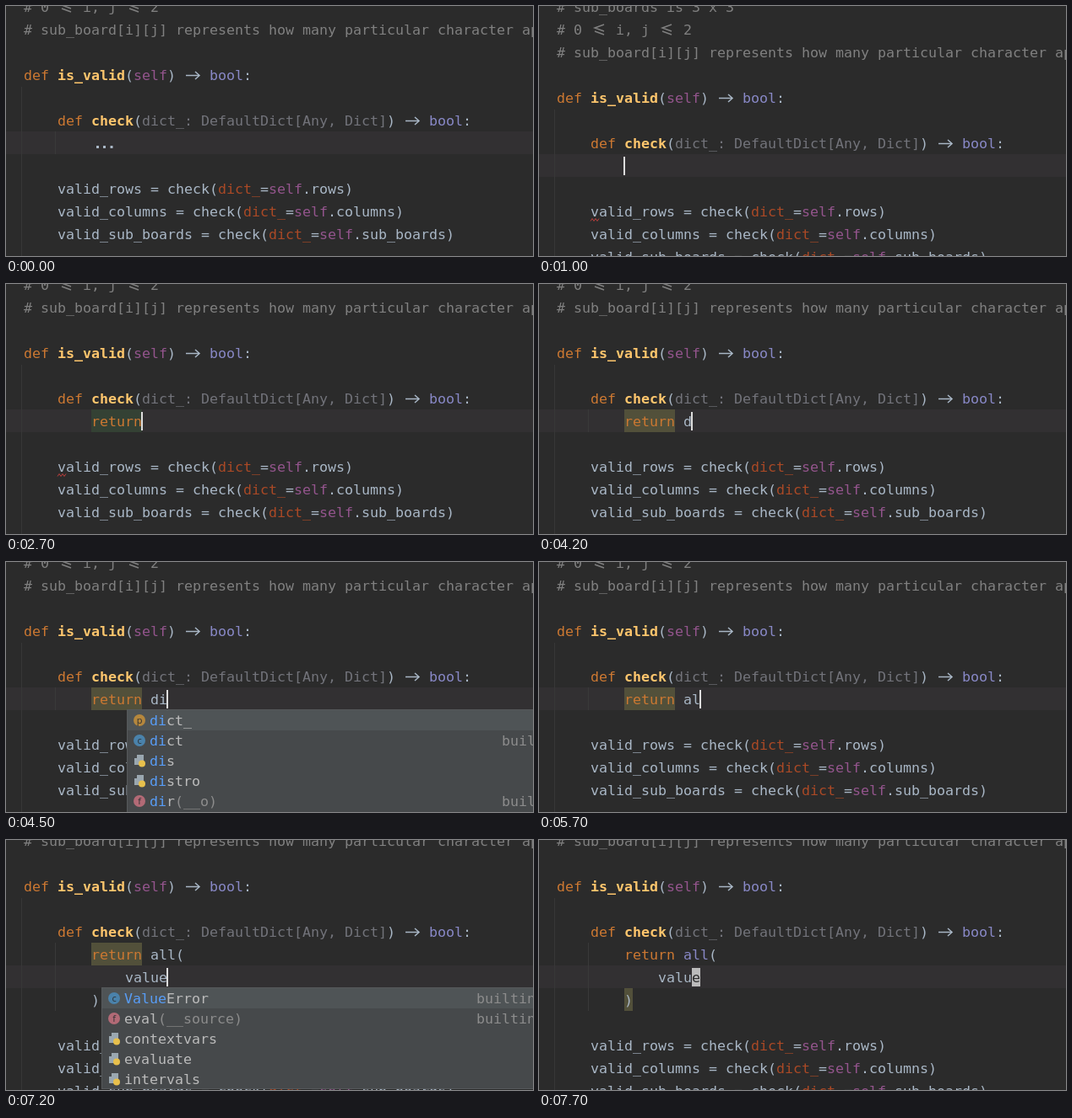
Write an HTML page with a canvas that moves like this. It is 624x297 px and loops after 8 s.

```html
<!DOCTYPE html>
<html lang="en">
<head>
<meta charset="utf-8">
<title>Typing in a code editor</title>
<style>
  html, body { margin: 0; width: 100%; height: 100%; overflow: hidden; background: #2b2b2b; }
  canvas { display: block; }
</style>
</head>
<body>
<canvas id="stage" width="624" height="297"></canvas>
<script>
const ctx = document.getElementById('stage').getContext('2d');
const LOOP = 8000, CELL = 10, ROW = 27, LEFT = 21, CARET_ROW = 149, ITEM = 24;
const MONO = '16.61px "DejaVu Sans Mono", monospace';
const UI = '11px "Open Sans", sans-serif';
const COLORS = {
  t: '#a9b7c6', k: '#cc7832', f: '#ffc66d', s: '#94558d', b: '#8888c6',
  g: '#72737a', c: '#808080', n: '#aa4926'
};
const GREEN = '#344134', OLIVE = '#52503a';

// Markup: {colour:text}; {a:} is a long arrow, {l:} a wide "less or equal", {e:} an ellipsis.
const HEAD = [
  '{c:# sub_boards is 3 x 3}',
  '{c:# 0 }{l:}{c: i, j }{l:}{c: 2}',
  '{c:# sub_board[i][j] represents how many particular character appears}',
  '',
  '{k:def }{f:is_valid}({s:self}) {a:} {b:bool}:',
  '',
  '    {k:def }{f:check}({g:dict_: DefaultDict[Any, Dict]}) {a:} {b:bool}:'
];
const TAIL = ['', ...['rows', 'columns', 'sub_boards'].map(
  name => `    valid_${name} = check({n:dict_}={s:self}.${name})`)];

const IN = ' '.repeat(8), RET = IN + '{k:return} ';
const call = (name, value) => [`${RET}${name}(`, IN + '    ' + value, IN + ')'];

// Popup items: icon|name|arguments|origin
const reItems = ['|return', 'c|reversed||builtins', 'f|repr|(__obj)|builtins', 'm|re', 'm|reprlib', 'm|resource'];
const retItems = ['|return', 'd|secretstorage', 'm|secrets'];
const dItems = ['p|dict_', 'c|dict||builtins', 'f|dir|(__o)|builtins', 'f|divmod|(__x, __y)|builtins', 'f|delattr|(__o, __name)|builtins', 'm|dis'];
const diItems = ['p|dict_', 'c|dict||builtins', 'm|dis', 'm|distro', 'f|dir|(__o)|builtins', 'f|divmod|(__x, __y)|builtins'];
const aItems = ['f|all|(__iterable)|builtins', 'f|any|(__iterable)|builtins', 'f|abs|(__x)|builtins', 'f|ascii|(__obj)|builtins', '|await', 'm|ast'];
const alItems = ['f|all|(__iterable)|builtins', 'c|FloatingPointError||builtins', 'f|callable|(__obj)|builtins', 'f|eval|(__source)|builtins', 'c|ValueError||builtins', 'm|calendar'];
const vItems = ['f|vars|(__object)|builtins', 'c|ValueError||builtins', 'm|venv', 'f|eval|(__source)|builtins', 'm|array'];
const valItems = ['c|ValueError||builtins', 'f|eval|(__source)|builtins', 'm|contextvars', 'm|evaluate', 'm|intervals'];
const menu = (items, word, prefix, opts) => ({ items, x: LEFT + word * CELL - 1, prefix, ...opts });
const TIP = { tip: true }, WIDE = { wide: true };

// Each step changes some fields of the editor state.
const STEPS = [
  [0, { body: [IN + '{e:}'], line: 0, back: 0, shift: 0, caret: '', guide: true, squiggle: false, mark: null, menu: null, brace: false, closeMark: false }],
  [200, { caret: 'block' }],
  [700, { body: [IN], shift: ROW, caret: 'bar', guide: false }],
  [1000, { squiggle: true }],
  [1200, { body: [IN + 'r'], shift: 0 }],
  [1300, { body: [IN + 're'], menu: menu(reItems, 8, 're') }],
  [1500, { body: [IN + 'ret'], menu: menu(retItems, 8, 'ret', TIP) }],
  [1700, { body: [IN + 'retu'], squiggle: false, menu: menu(['|return', '|'], 8, 'retu', TIP) }],
  [2200, { body: [IN + 'retur'], menu: menu(['|return', '|'], 8, 'retur', TIP) }],
  [2600, { body: [IN + 'return'], squiggle: true, menu: null }],
  [2700, { body: [IN + '{k:return}'], mark: GREEN }],
  [2900, { body: [RET], mark: null }],
  [3000, { squiggle: false }],
  [3400, { mark: OLIVE, guide: true }],
  [4200, { body: [RET + 'd'] }],
  [4300, { menu: menu(dItems, 15, 'd', WIDE) }],
  [4400, { body: [RET + 'di'], menu: menu(dItems, 15, 'di', WIDE) }],
  [4500, { menu: menu(diItems, 15, 'di') }],
  [4800, { body: [RET + 'a'], menu: menu(aItems, 15, 'a', WIDE) }],
  [5700, { body: [RET + 'al'], menu: null }],
  [5800, { menu: menu(alItems, 15, 'al', WIDE) }],
  [5900, { body: [RET + 'all'], menu: menu(alItems, 15, 'all', WIDE) }],
  [6100, { body: [RET + 'all()'], back: 1, menu: null }],
  [6200, { brace: true }],
  [6400, { body: call('all', ''), line: 1, back: 0, brace: false }],
  [6800, { body: call('all', 'v') }],
  [6900, { body: call('all', 'va'), menu: menu(vItems, 12, 'va') }],
  [7000, { body: call('all', 'val'), menu: menu(valItems, 12, 'val') }],
  [7100, { body: call('all', 'valu'), menu: menu(valItems, 12, 'valu') }],
  [7200, { body: call('all', 'value'), menu: menu(valItems, 12, 'value') }],
  [7300, { body: call('{b:all}', 'value'), menu: null, mark: null }],
  [7400, { closeMark: true }],
  [7700, { caret: 'block' }]
];

function stateAt(t) {
  return Object.assign({}, ...STEPS.filter(([at]) => at <= t).map(([, change]) => change));
}

function box(x, y, w, h, color) {
  ctx.fillStyle = color;
  ctx.fillRect(x, y, w, h);
}

function text(str, x, y, color, font = MONO) {
  ctx.font = font;
  ctx.fillStyle = color;
  ctx.fillText(str, x, y);
}

function stroke(points, color, width = 1.5) {
  ctx.beginPath();
  points.forEach(([x, y]) => ctx.lineTo(x, y));
  ctx.strokeStyle = color;
  ctx.lineWidth = width;
  ctx.stroke();
}

function disc(x, y, r, color) {
  ctx.beginPath();
  ctx.arc(x, y, r, 0, 7);
  ctx.fillStyle = color;
  ctx.fill();
}

const GLYPHS = {
  a(x, y) {
    stroke([[x + 2, y - 5.5], [x + 18, y - 5.5]], COLORS.t);
    stroke([[x + 13, y - 10], [x + 18, y - 5.5], [x + 13, y - 1]], COLORS.t);
    return 2;
  },
  l(x, y) {
    stroke([[x + 16, y - 12], [x + 5, y - 8], [x + 16, y - 4]], COLORS.c);
    stroke([[x + 5, y - 4], [x + 16, y]], COLORS.c);
    return 2;
  },
  e(x, y) {
    [6, 14, 22.5].forEach(dx => box(x + dx, y - 3, 3, 3, COLORS.t));
    return 3;
  }
};

// Draws one line of markup and returns its length in cells.
function codeLine(markup, y) {
  let col = 0;
  for (const [all, key, inner] of markup.matchAll(/\{(\w):([^}]*)\}|[^{]+/g)) {
    const x = LEFT + col * CELL;
    if (GLYPHS[key]) { col += GLYPHS[key](x, y); continue; }
    const str = key ? inner : all;
    text(str, x, y, COLORS[key || 't'], key === 'f' ? 'bold ' + MONO : MONO);
    col += str.length;
  }
  return col;
}

function icon(kind, x, y) {
  const fill = { p: '#b5873d', c: '#4a82ab', f: '#b26a76' }[kind];
  if (fill) {
    disc(x, y, 7, fill);
    ctx.textAlign = 'center';
    text(kind, x, y + 3.5, '#2d3033', UI);
    ctx.textAlign = 'left';
  } else if (kind === 'd') {
    box(x - 7, y - 6, 6, 3, '#9aa7b0');
    box(x - 7, y - 4, 14, 9, '#9aa7b0');
    box(x - 1.5, y - 1, 3, 3, '#46494b');
  } else if (kind === 'm') {
    box(x - 3, y - 7, 8, 12, '#9aa7b0');
    box(x - 6, y - 3, 8, 8, '#9aa7b0');
    disc(x + 3, y + 3.5, 4, '#e8c04c');
  }
}

function drawMenu({ items, x, prefix, tip, wide }) {
  const left = x - (wide ? 37 : 27), top = 176;
  const width = x + 509 - left, height = items.length * ITEM + (tip ? 25 : 0);
  box(left, top, width, height, '#46494b');
  box(left, top, width, ITEM, '#4f5456');
  items.forEach((item, i) => {
    const [kind, name, args = '', origin = ''] = item.split('|');
    const y = top + i * ITEM + 18, font = kind ? MONO : 'bold ' + MONO;
    const from = name.toLowerCase().indexOf(prefix);
    icon(kind, x - 12, y - 6);
    text(name, x, y, '#bbbbbb', font);
    if (from >= 0) {
      const start = x + from * CELL;
      box(start, y - 15, prefix.length * CELL, 20, i ? '#46494b' : '#4f5456');
      text(name.substr(from, prefix.length), start, y, '#589df6', font);
    }
    text(args, x + name.length * CELL, y, '#8c8c8c');
    text(origin, x + 417, y, '#8c8c8c');
  });
  if (tip) {
    const y = top + height - 9;
    text('Press Ctrl+. to choose the selected (or first) suggestion and insert a dot afterwards', x - 16, y, '#8c8c8c', UI);
    text('Next Tip', x + 411, y, '#589df6', UI);
    [-10, -5, 0].forEach(dy => disc(x + 498, y + dy + 1, 1.5, '#c4c7c9'));
  }
  ctx.strokeStyle = '#56595b';
  ctx.lineWidth = 1;
  ctx.strokeRect(left + 0.5, top - 0.5, width - 1, height);
}

function draw(t) {
  const s = stateAt(t);
  const lines = [...HEAD, ...s.body, ...TAIL];
  const first = HEAD.length, current = first + s.line;
  const top = n => CARET_ROW + (n - current) * ROW + s.shift;

  box(0, 0, 624, 297, '#2b2b2b');
  box(0, top(current), 624, ROW, '#323032');
  box(18, top(5) + 1, 1, 297, '#373737');
  if (s.guide) box(58, top(first), 1, s.body.length * ROW, '#393939');
  if (s.mark) box(101, top(first), 60, ROW, s.mark);
  if (s.closeMark) box(101, top(first + 2), CELL, ROW, OLIVE);
  if (s.brace) box(201, top(first), 2 * CELL, ROW, '#3b514d');

  const lengths = lines.map((line, n) => codeLine(line, top(n) + 20));

  if (s.squiggle) {
    const y = top(first + s.body.length + 1) + 24;
    stroke([0, 1, 2, 3, 4, 5].map(i => [61 + i * 2, y + (i % 2 ? -1.5 : 1.5)]), '#bc3f3c', 1);
  }

  const x = LEFT + (lengths[current] - s.back) * CELL, y = top(current) + 3;
  if (s.caret === 'bar') box(x - 1, y, 2, 22, '#dddddd');
  if (s.caret === 'block') {
    box(x - CELL, y, CELL, 22, '#bbbbbb');
    if (t < 700) box(x - 7.5, y + 14, 3, 3, '#2b2b2b');
    else text('e', x - CELL, y + 17, '#2b2b2b');
  }
  if (s.menu) drawMenu(s.menu);
}

function frame() {
  draw(performance.now() % LOOP);
  requestAnimationFrame(frame);
}
frame();
</script>
</body>
</html>
```
